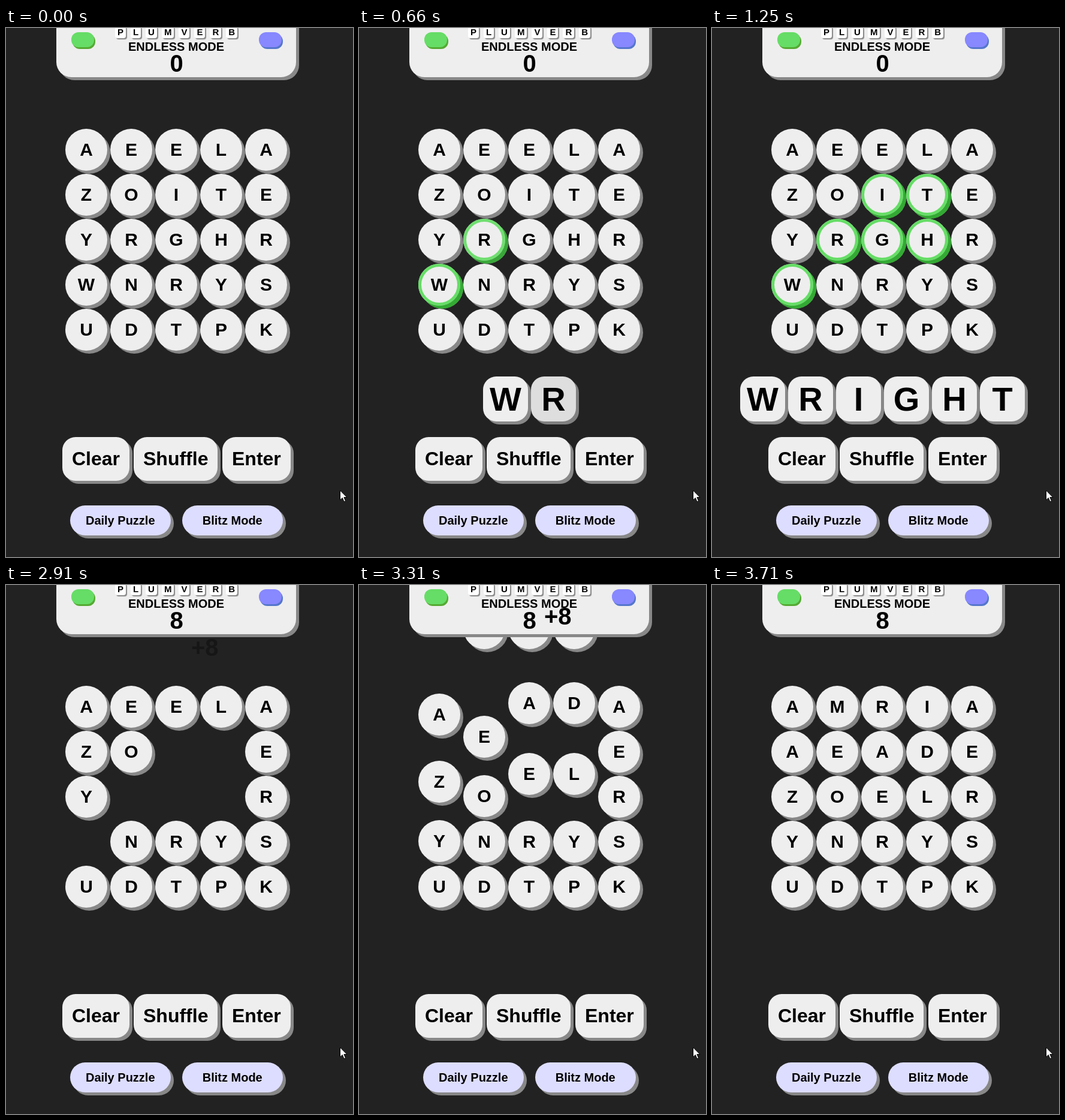
These frames come from a looping animation (579x882 px, 5.03 s). An HTML page:

```html
<!DOCTYPE html>
<html lang="en">
<head>
<meta charset="utf-8">
<title>Word game</title>
<style>
  html, body { margin: 0; width: 100%; height: 100%; overflow: hidden; background: #222; }
  body { position: relative; font: bold 32px Arial, "Liberation Sans", sans-serif; color: #000; }
  body div, svg { position: absolute; box-sizing: border-box; white-space: nowrap; text-align: center; }
  .tile, .card, .btn, .link, #head { background: #eee; box-shadow: 5px 5px #888; }
  .tile { width: 70px; height: 70px; border-radius: 50%; font-size: 30px; line-height: 70px; }
  .ring { inset: 0; border: 5px solid #6d6; border-radius: 50%; box-shadow: 5px 5px #3a3; opacity: 0; }
  .card { top: 581px; width: 75px; height: 75px; border-radius: 22px; font-size: 56px; line-height: 75px; }
  .btn { top: 682px; height: 73px; padding: 0 16px; border-radius: 22px; line-height: 73px; }
  .link { top: 796px; width: 167.5px; height: 50px; border-radius: 25px; background: #ddf; font-size: 20px; line-height: 50px; }
  #head { left: 84px; top: -40px; width: 400px; height: 122px; border-radius: 25px; }
  .pill { top: 7px; width: 38px; height: 25px; border-radius: 12px; }
  #logo { left: 84px; top: -3px; width: 400px; display: flex; justify-content: center; gap: 8px; font-size: 15px; line-height: 20px; }
  #logo span { padding: 0 4px; border-radius: 4px; background: #fff; box-shadow: 2px 2px 1px #888; }
  #mode { left: 84px; top: 21px; width: 400px; font-size: 20px; line-height: 20px; }
  #score, #gain { top: 39px; font-size: 40px; line-height: 40px; }
  #score { left: 84px; width: 401px; }
  #gain { left: 309px; top: -20px; }
</style>
</head>
<body>
<div id="board"></div>
<div id="word"></div>
<div id="head"></div>
<div class="pill" style="left:109px;background:#6d6;box-shadow:2px 3px #5a3"></div>
<div class="pill" style="left:422px;background:#88f;box-shadow:2px 3px #57c"></div>
<div id="logo"></div>
<div id="gain">+8</div>
<div id="mode">ENDLESS MODE</div>
<div id="score">0</div>
<div class="btn" style="left:94px">Clear</div>
<div class="btn" style="left:213px">Shuffle</div>
<div class="btn" style="left:361px">Enter</div>
<div class="link" style="left:107px">Daily Puzzle</div>
<div class="link" style="left:294px">Blitz Mode</div>
<svg style="left:556px;top:769px" width="16" height="24">
  <path d="M1.5 2v16l3.8-3.6 2.7 6.3 2.6-1.1-2.7-6.1h5z" fill="#fff" stroke="#000"/>
</svg>
<script>
const LOOP = 5030, TYPE = 460, DROP = 2910, STEP = 65.8;
const PITCH = 75, TOP = 168, HIDDEN = -7;
const $ = id => document.getElementById(id);
const clamp = v => Math.min(1, Math.max(0, v));
const easeOut = p => 1 - (1 - p) ** 3;
const swing = p => 0.5 - Math.cos(Math.PI * p) / 2;

function add(parent, cls, text = '') {
  const el = document.createElement('div');
  el.className = cls;
  el.textContent = text;
  parent.append(el);
  return el;
}

function addTile(letter, col) {
  const el = add($('board'), 'tile', letter);
  el.style.left = 99 + col * PITCH + 'px';
  return el;
}

for (const c of 'PLUMVERB') {
  const span = document.createElement('span');
  span.textContent = c;
  $('logo').append(span);
}

const grid = ['AEELA', 'ZOITE', 'YRGHR', 'WNRYS', 'UDTPK'].map((line, row) =>
  [...line].map((letter, col) => {
    const el = addTile(letter, col);
    el.style.top = TOP + row * PITCH + 'px';
    return el;
  }));

// Chosen letters as [row, column], in typing order
const picks = [[3, 0], [2, 1], [1, 2], [2, 2], [2, 3], [1, 3]].map(([row, col], i) => {
  const tile = grid[row][col];
  return {
    tile,
    card: add($('word'), 'card', tile.textContent),
    ring: add(tile, 'ring'),
    start: TYPE - 20 + 130 * i
  };
});

// Tiles already on the board: row, column, rows to fall, start time
const falls = [
  [2, 0, 1, 2983], [1, 0, 1, 3092], [0, 0, 1, 3211],
  [1, 1, 1, 2983], [0, 1, 1, 3092],
  [0, 2, 2, 3073], [0, 3, 2, 3073]
].map(([row, col, rows, start]) => {
  const from = TOP + row * PITCH;
  return { el: grid[row][col], from, to: from + rows * PITCH, start };
});

// New tiles from behind the header: letter, column, target row, start time
for (const [letter, col, row, start] of [
  ['A', 0, 0, 3305], ['M', 1, 0, 3188],
  ['A', 2, 1, 3090], ['R', 2, 0, 3188],
  ['D', 3, 1, 3090], ['I', 3, 0, 3188]
]) falls.push({ el: addTile(letter, col), from: HIDDEN, to: TOP + row * PITCH, start });

function render(time) {
  // Motion runs at about 15 pictures per second
  const base = time < DROP ? TYPE : DROP;
  const t = base + Math.floor((time - base) / STEP) * STEP;
  const dropped = t >= DROP;

  const typed = picks.filter(p => t >= p.start).length;
  picks.forEach((p, i) => {
    const shown = dropped ? 0 : easeOut(clamp((t - p.start) / 150));
    p.tile.style.visibility = dropped ? 'hidden' : 'visible';
    p.ring.style.opacity = p.card.style.opacity = shown;
    p.card.style.left = 287 - 40 * typed + 80 * i + 'px';
  });

  for (const f of falls)
    f.el.style.top = f.from + (f.to - f.from) * swing(clamp((t - f.start) / 350)) + 'px';

  $('score').textContent = dropped ? 8 : 0;
  const u = t - DROP;
  const y = 46.6 + 57.4 * (1 - clamp(u / 580)) ** 2;
  $('gain').style.transform = `translateY(${y}px)`;
  $('gain').style.opacity = dropped ? Math.min(clamp(0.35 + u / 100), clamp((730 - u) / 330)) : 0;
}

const begin = performance.now();
(function tick() {
  render((performance.now() - begin) % LOOP);
  requestAnimationFrame(tick);
})();
</script>
</body>
</html>
```
